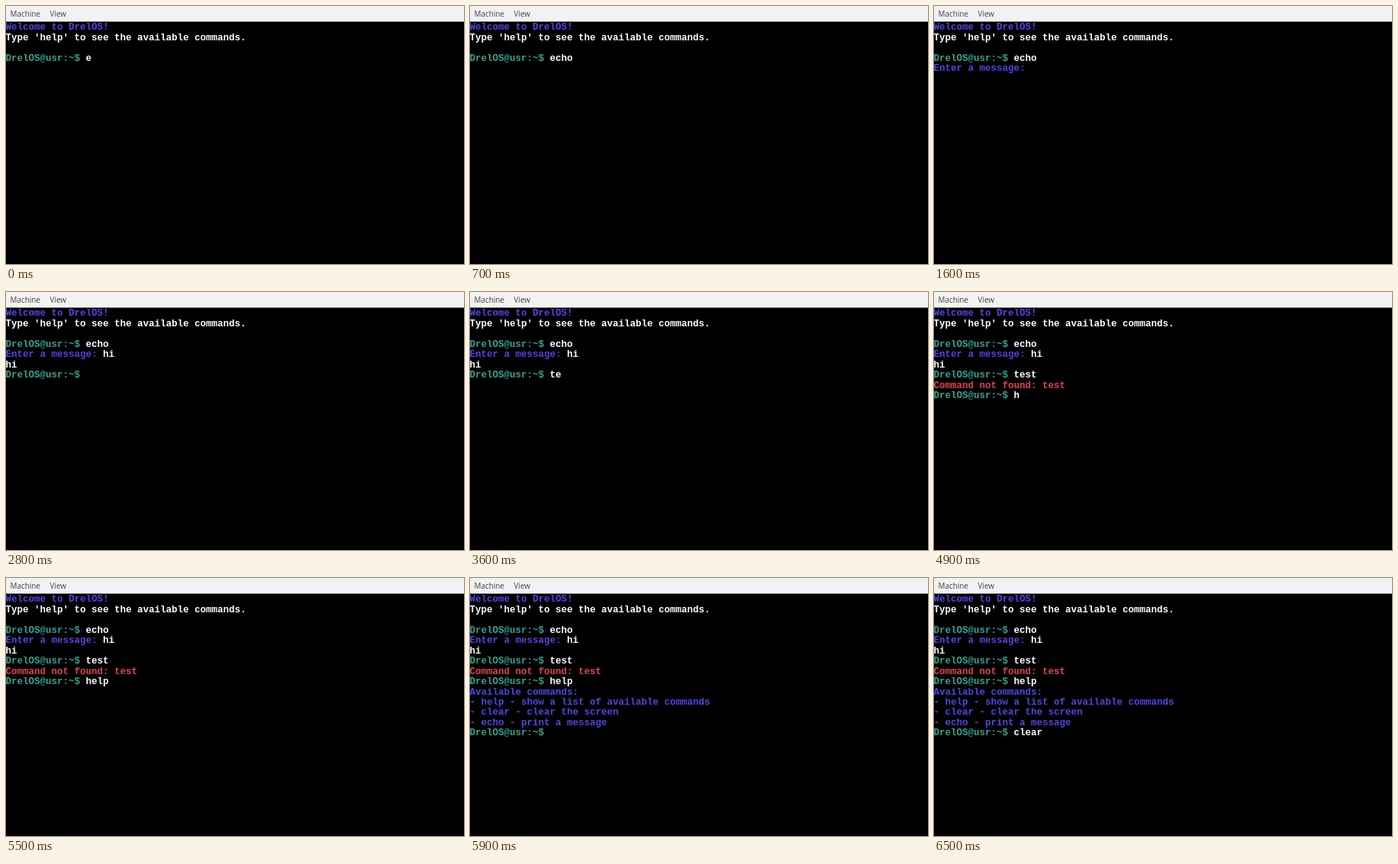
Write an HTML page with a canvas that moves like this. It is 600 by 338 pixels and loops after 6.6 s.

```html
<!DOCTYPE html>
<html lang="en">
<head>
<meta charset="utf-8">
<title>Terminal</title>
<style>
html, body { margin: 0; width: 100%; height: 100%; overflow: hidden; background: #000; }
canvas { display: block; width: 600px; height: 338px; }
</style>
</head>
<body>
<canvas id="stage" width="600" height="338"></canvas>
<script>
const ctx = document.getElementById('stage').getContext('2d');
const LOOP = 6600;
const COL = 7.5, ROW = 13.46, BASE = 31.4;
const BLUE = '#5046e2', TEAL = '#35a48f', RED = '#e3434f', WHITE = '#fff';
const PROMPT = 'DrelOS@usr:~$ ';

// Each entry: row, column, text, colour, and when it appears.
// A list of times reveals one character per time.
const script = [
  [0, 0, 'Welcome to DrelOS!', BLUE, 0],
  [1, 0, "Type 'help' to see the available commands.", WHITE, 0],
  [3, 0, PROMPT, TEAL, 0],
  [3, 14, 'echo', WHITE, [0, 100, 300, 400]],
  [4, 0, 'Enter a message:', BLUE, 900],
  [4, 17, 'hi', WHITE, [1700, 1800]],
  [5, 0, 'hi', WHITE, 2200],
  [6, 0, PROMPT, TEAL, 2200],
  [6, 14, 'test', WHITE, [3500, 3600, 3700, 3900]],
  [7, 0, 'Command not found: test', RED, 4500],
  [8, 0, PROMPT, TEAL, 4500],
  [8, 14, 'help', WHITE, [4900, 5000, 5100, 5300]],
  [9, 0, 'Available commands:', BLUE, 5700],
  [10, 0, '- help - show a list of available commands', BLUE, 5700],
  [11, 0, '- clear - clear the screen', BLUE, 5700],
  [12, 0, '- echo - print a message', BLUE, 5700],
  [13, 0, PROMPT, TEAL, 5700],
  [13, 14, 'clear', WHITE, [6000, 6100, 6200, 6300, 6400]]
];

function visible(text, when, t) {
  if (Array.isArray(when)) return text.slice(0, when.filter(w => w <= t).length);
  return t >= when ? text : '';
}

function drawMenu() {
  ctx.fillStyle = '#f2f2f2';
  ctx.fillRect(0, 0, 600, 20.5);
  ctx.fillStyle = '#444';
  ctx.font = '9.9px "Open Sans", sans-serif';
  ctx.fillText('Machine', 5.6, 14.4);
  ctx.fillText('View', 57.5, 14.4);
}

function drawTerminal(t) {
  ctx.font = 'bold 12.5px "Liberation Mono", monospace';
  for (const [row, col, text, color, when] of script) {
    ctx.fillStyle = color;
    [...visible(text, when, t)].forEach((ch, i) => {
      ctx.fillText(ch, (col + i) * COL - 0.4, BASE + row * ROW);
    });
  }
}

function frame() {
  const t = performance.now() % LOOP;
  ctx.fillStyle = '#000';
  ctx.fillRect(0, 0, 600, 338);
  drawMenu();
  drawTerminal(t);
  requestAnimationFrame(frame);
}
frame();
</script>
</body>
</html>
```
